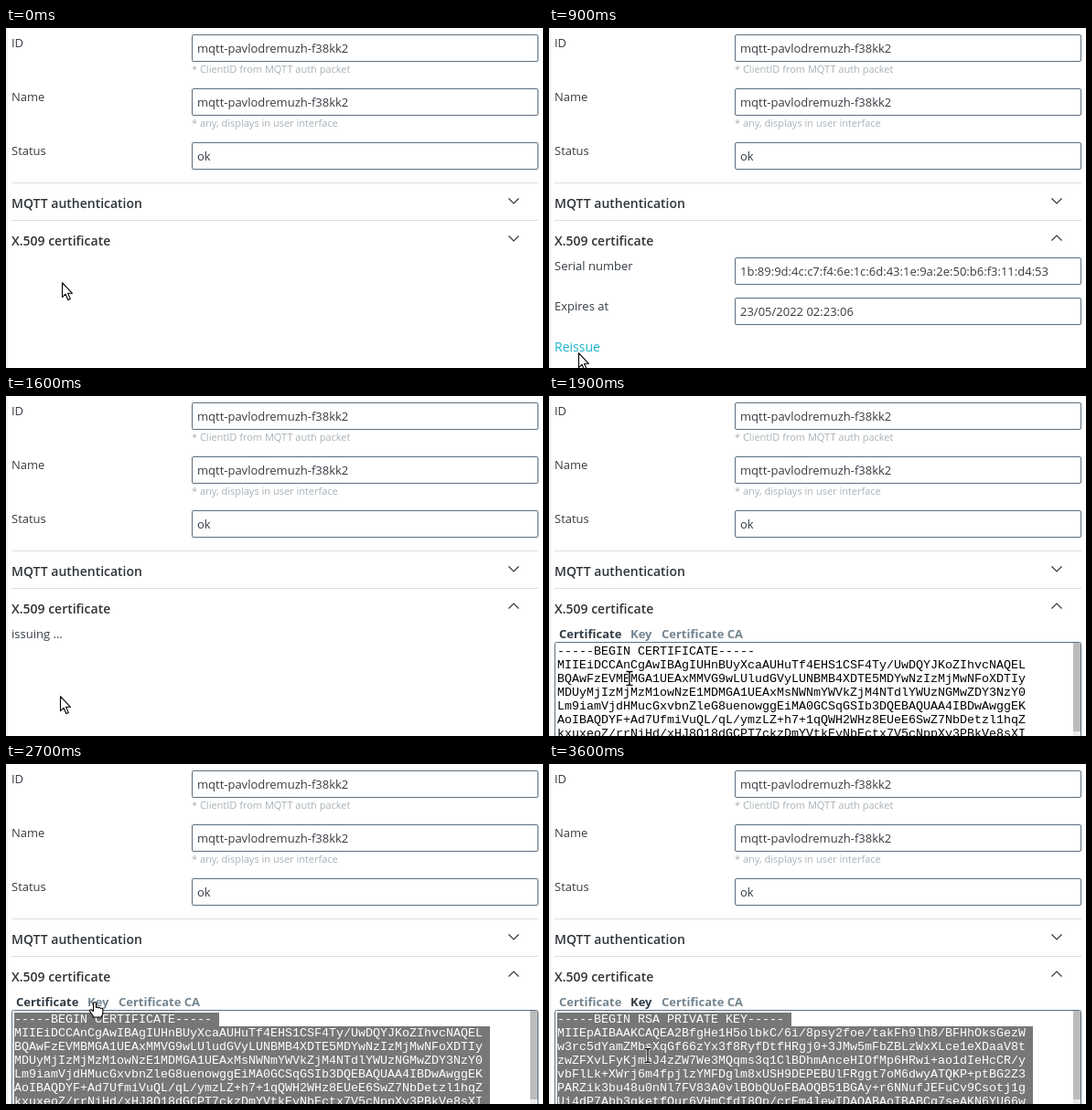
These frames come from a looping animation (587 by 372 pixels, 3700 ms). An HTML page:

```html
<!DOCTYPE html>
<html lang="en">
<head>
<meta charset="utf-8">
<title>Certificate panel</title>
<style>
html, body { margin: 0; width: 100%; height: 100%; overflow: hidden; background: #fff; }
svg { display: block; }
text { font: 13px "Open Sans", sans-serif; fill: #363c42; white-space: pre; }
.hint { font-size: 11px; fill: #a9b2b8; }
.head { font-size: 14px; font-weight: 600; fill: #2f3439; }
.link { font-size: 14px; fill: #18b4c9; }
.tab { font-weight: 700; fill: #74848f; }
.tab.on { fill: #2f3b45; }
.code { font: 13.3333px "Liberation Mono", monospace; fill: #000; }
.selected .code { fill: #fff; }
.mark { fill: #777; visibility: hidden; }
.selected .mark { visibility: inherit; }
.box { fill: #fff; stroke: #5d6f7d; }
.rule { stroke: #dcdfe1; }
.chevron { fill: none; stroke: #30363b; stroke-width: 1.2; }
.cursor { fill: #fff; stroke: #000; stroke-width: 1.1; stroke-linejoin: round; }
</style>
</head>
<body>
<svg id="stage" width="587" height="372" viewBox="0 0 587 372">
  <defs>
    <linearGradient id="edge"><stop stop-color="#eceeef"/><stop offset="1" stop-color="#fff"/></linearGradient>
    <path id="beamShape" d="M-3.5-7.5H-1.5Q0-7.5 0-6Q0-7.5 1.5-7.5H3.5M0-6V6M-3.5 7.5H-1.5Q0 7.5 0 6Q0 7.5 1.5 7.5H3.5" fill="none"/>
  </defs>
  <rect width="3" height="372" fill="url(#edge)"/>
  <g id="form"></g>
  <path id="closed" class="chevron" d="M549.5 227.5L555 233L560.5 227.5"/>
  <path id="opened" class="chevron" d="M549.5 232.5L555 227L560.5 232.5"/>
  <g id="details"></g>
  <path id="underline" d="M6 355.5H56" stroke="#18b4c9"/>
  <g id="issuing"></g>
  <g id="result">
    <rect class="box" x="6.5" y="269.5" width="575" height="120" rx="2"/>
    <rect x="573" y="270" width="8" height="102" fill="#ececec"/>
    <rect x="573" y="270" width="8" height="97" fill="#bcbcbc"/>
    <g id="cert"></g>
    <g id="key"></g>
    <g id="tabs"></g>
  </g>
  <g id="cursor" class="cursor">
    <path id="arrow" d="M.5.7V16.6L4.1 13.2L6.8 19.5L9.3 18.4L6.6 12.3H11.5Z"/>
    <path id="hand" d="M-1.5 10.5V2a1.5 1.5 0 0 1 3 0V6.5q1.3-1.3 2.6.3q1.4-1 2.5.6q2.3-.6 2.3 1.8V12q0 2-1.2 3.5V17H-1.8V15.5Q-4 13-5.5 10.2Q-5.6 8.4-3.6 8.9Z"/>
    <g id="beam">
      <use href="#beamShape" stroke="#fff" stroke-width="2.8"/>
      <use href="#beamShape" stroke="#000" stroke-width="1.3"/>
    </g>
  </g>
</svg>
<script>
const LOOP = 3700, STEP = 100;
const DEVICE = "mqtt-pavlodremuzh-f38kk2";
const $ = id => document.getElementById(id);

function add(parent, tag, attrs, text = "") {
  const el = document.createElementNS("http://www.w3.org/2000/svg", tag);
  for (const name in attrs) el.setAttribute(name, attrs[name]);
  el.textContent = text;
  return $(parent).appendChild(el);
}
const label = (parent, x, y, text, cls = "") => add(parent, "text", { x, y, class: cls }, text);

function field(parent, y, name, value, hint) {
  label(parent, 6, y + 14, name);
  add(parent, "rect", { x: 203.5, y: y + .5, width: 378, height: 29, rx: 1.5, class: "box" });
  label(parent, 209, y + 20, value);
  if (hint) label(parent, 203, y + 42, hint, "hint");
}

function section(y, title) {
  add("form", "path", { d: `M6 ${y + .5}H582`, class: "rule" });
  label("form", 6, y + 28, title, "head");
}

function codeBlock(parent, lines) {
  lines.forEach((line, i) => {
    const y = 272 + i * 15;
    add(parent, "rect", { x: 9, y, width: (line.length + 1) * 8, height: 15, class: "mark" });
    label(parent, 9, y + 11, line, "code");
  });
}

field("form", 7, "ID", DEVICE, "* ClientID from MQTT auth packet");
field("form", 66, "Name", DEVICE, "* any, displays in user interface");
field("form", 125, "Status", "ok");
section(169, "MQTT authentication");
section(210, "X.509 certificate");
add("form", "path", { d: "M549.5 186.5L555 192L560.5 186.5", class: "chevron" });

field("details", 251, "Serial number", "1b:89:9d:4c:c7:f4:6e:1c:6d:43:1e:9a:2e:50:b6:f3:11:d4:53");
field("details", 295, "Expires at", "23/05/2022 02:23:06");
label("details", 6, 354, "Reissue", "link");
label("issuing", 6, 265, "issuing ...");

const certTab = label("tabs", 11, 265, "Certificate", "tab");
const keyTab = label("tabs", 89, 265, "Key", "tab");
label("tabs", 123, 265, "Certificate CA", "tab");

codeBlock("cert", [
  "-----BEGIN CERTIFICATE-----",
  "MIIEiDCCAnCgAwIBAgIUHnBUyXcaAUHuTf4EHS1CSF4Ty/UwDQYJKoZIhvcNAQEL",
  "BQAwFzEVMBMGA1UEAxMMVG9wLUludGVyLUNBMB4XDTE5MDYwNzIzMjMwNFoXDTIy",
  "MDUyMjIzMjMzM1owNzE1MDMGA1UEAxMsNWNmYWVkZjM4NTdlYWUzNGMwZDY3NzY0",
  "Lm9iamVjdHMucGxvbnZleG8uenowggEiMA0GCSqGSIb3DQEBAQUAA4IBDwAwggEK",
  "AoIBAQDYF+Ad7UfmiVuQL/qL/ymzLZ+h7+1qQWH2WHz8EUeE6SwZ7NbDetzl1hqZ",
  "kxuxeoZ/rrNiHd/xHJ8Q18dGCPT7ckzDmYVtkEyNbEctx7V5cNppXy3PBkVe8sXI"
]);
codeBlock("key", [
  "-----BEGIN RSA PRIVATE KEY-----",
  "MIIEpAIBAAKCAQEA2BfgHe1H5olbkC/6i/8psy2foe/takFh9lh8/BFHhOksGezW",
  "w3rc5dYamZMbsXqGf66zYx3f8RyfDtfHRgj0+3JMw5mFbZBLzWxXLce1eXDaaV8t",
  "zwZFXvLFyKjmhJ4zZW7We3MQqms3q1ClBDhmAnceHIOfMp6HRwi+ao1dIeHcCR/y",
  "vbFlLk+XWrj6m4fpjlzYMFDglm8xUSH9DEPEBUlFRggt7oM6dwyATQKP+ptBG2Z3",
  "PARZik3bu48u0nNl7FV83A0vlBObQUoFBAOQB51BGAy+r6NNufJEFuCv9Csotj1g",
  "Ui4dP7Abb3gketfOur6VHmCfdI8Op/crEm4lewIDAQABAoIBABCg7seAKN6YU66w"
]);

// Pointer path: time, hotspot x, y, shape from that time on
const path = [
  [0, 61, 278, "arrow"], [400, 56, 233, "hand"], [600, 56, 233, "hand"],
  [700, 32, 362, "arrow"], [800, 32, 362, "arrow"], [900, 32, 355, "arrow"],
  [1000, 37, 347, "hand"], [1100, 37, 347, "hand"], [1200, 38, 347, "arrow"],
  [1600, 59, 328, "arrow"], [1700, 67, 326, "beam"], [1900, 88, 309, "beam"],
  [2300, 88, 309, "beam"], [2600, 95, 273, "beam"], [2700, 97, 260, "hand"],
  [2900, 97, 260, "hand"], [3000, 99, 272, "beam"], [3400, 109, 313, "beam"],
  [3600, 108, 319, "beam"], [LOOP, 108, 319, "beam"]
];

const show = (id, on) => $(id).setAttribute("visibility", on ? "inherit" : "hidden");

function render(t) {
  const open = t >= 600, issued = t >= 1700, onKey = t >= 2900;
  show("closed", !open);
  show("opened", open);
  show("details", open && t < 1200);
  show("underline", t >= 1000 && t < 1200);
  show("issuing", t >= 1200 && !issued);
  show("result", issued);
  show("cert", issued && !onKey);
  show("key", onKey);
  $("result").classList.toggle("selected", t >= 2300);
  certTab.classList.toggle("on", !onKey);
  keyTab.classList.toggle("on", onKey);

  const next = path.findIndex(p => p[0] > t);
  const [t0, x0, y0, shape] = path[next - 1], [t1, x1, y1] = path[next];
  const k = (t - t0) / (t1 - t0);
  const x = Math.round(x0 + (x1 - x0) * k), y = Math.round(y0 + (y1 - y0) * k);
  $("cursor").setAttribute("transform", `translate(${x} ${y})`);
  for (const id of ["arrow", "hand", "beam"]) show(id, id === shape);
}

const start = performance.now();
function tick() {
  const t = (performance.now() - start) % LOOP;
  render(Math.floor(t / STEP) * STEP);
  requestAnimationFrame(tick);
}
tick();
</script>
</body>
</html>
```
